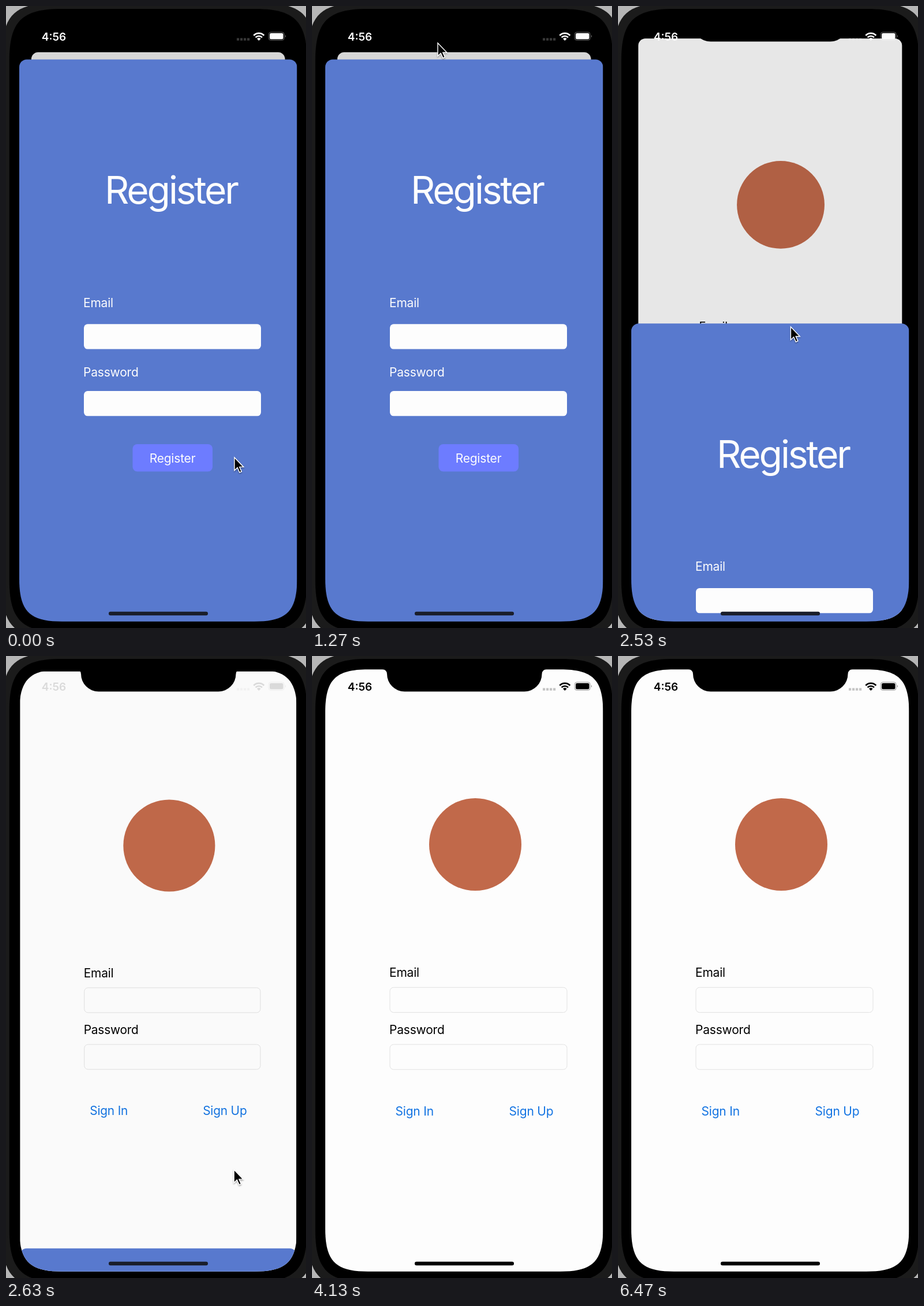
These frames come from a looping animation (520 by 1076 pixels, 6510 ms). An HTML page:

```html
<!DOCTYPE html>
<html lang="en">
<head>
<meta charset="utf-8">
<title>Register</title>
<style>
  html, body { margin: 0; width: 100%; height: 100%; overflow: hidden; background: #b6b6b6; }
  svg { display: block; width: 100vw; height: 100vh; }
  text { font: 400 21px Inter, "Liberation Sans", sans-serif; font-optical-sizing: none; letter-spacing: -0.2px; }
  .title { font-size: 66px; letter-spacing: -3.2px; }
  .clock { font-size: 19px; font-weight: 600; letter-spacing: 0; }
  .mid { text-anchor: middle; }
</style>
</head>
<body>
<svg viewBox="0 0 520 1076" xmlns="http://www.w3.org/2000/svg">
  <defs>
    <clipPath id="screen"><path id="glass"/></clipPath>
    <rect id="field" x="135" width="307" height="43.3" rx="6.5"/>
    <rect id="card" x="23" y="23" width="481.5" height="1060" rx="13"/>
    <filter id="shadow" x="-50%" y="-50%" width="200%" height="200%">
      <feDropShadow dx="0" dy="1.5" stdDeviation="1.3" flood-color="#000" flood-opacity=".4"/>
    </filter>
  </defs>

  <rect width="520" height="1076" fill="#b6b6b6"/>
  <path id="rim" fill="#1b1b1b"/>
  <path id="bezel" fill="#000"/>

  <g clip-path="url(#screen)">
    <g id="page">
      <use href="#card" fill="#fdfdfd"/>
      <circle cx="283" cy="326" r="80" fill="#c1694a"/>
      <text x="134" y="555">Email</text>
      <text x="134" y="653.5">Password</text>
      <g fill="#fdfdfd" stroke="#e1e1e1">
        <use href="#field" y="573.3"/>
        <use href="#field" y="672"/>
      </g>
      <g class="mid" fill="#1273e2">
        <text x="177.7" y="795">Sign In</text>
        <text x="380" y="795">Sign Up</text>
      </g>
      <use id="dim" href="#card"/>
    </g>
  </g>

  <path d="M122 22V23A8 8 0 0 1 130 31A30.500 30.500 0 0 0 160.500 61.500H368A30.500 30.500 0 0 0 398.500 31A8 8 0 0 1 406.500 23V22Z"/>

  <g id="status" fill="currentColor">
    <text class="clock mid" x="83" y="59.500">4:56</text>
    <path d="M400 57.600H422.200" stroke="currentColor" stroke-width="4.200" stroke-dasharray="4.200 1.800" opacity=".22"/>
    <g fill="none" stroke="currentColor" stroke-width="2.700">
      <path d="M429.300 51A12.500 12.500 0 0 1 447.300 51"/>
      <path d="M432.600 54.400A8 8 0 0 1 444 54.400"/>
    </g>
    <path d="M438.300 60L434.900 56.500A5 5 0 0 1 441.700 56.500Z"/>
    <rect x="455.200" y="45.300" width="27" height="14" rx="4" fill="none" stroke="currentColor" stroke-opacity=".4"/>
    <rect x="457" y="47" width="23.500" height="10.600" rx="2.500"/>
    <path d="M484 50Q486 52.300 484 54.600Z" opacity=".5"/>
  </g>

  <g clip-path="url(#screen)">
    <g id="sheet" fill="#fdfdfd">
      <use href="#card" y="69.500" fill="#5879ce"/>
      <text class="title mid" x="286" y="342">Register</text>
      <text x="134" y="520.500">Email</text>
      <text x="134" y="641">Password</text>
      <use href="#field" y="550.300"/>
      <use href="#field" y="666"/>
      <rect x="219.500" y="758" width="138.500" height="47.300" rx="8" fill="#6d7cff"/>
      <text class="mid" x="288.500" y="790">Register</text>
    </g>
  </g>

  <rect id="home" x="178" y="1047.800" width="172" height="6.400" rx="3.200"/>

  <path id="cursor" d="M0 0V22.500L5.200 17.600L9 26L12.400 24.500L8.800 16.500H15.800Z"
        stroke="#fff" stroke-width="1.400" filter="url(#shadow)"/>
</svg>
<script>
const LOOP = 6510, TRAVEL = 972;
const SWIPE = { start: 2490, time: 215 };
const $ = id => document.getElementById(id);
const [page, dim, status, sheet, home, cursor] =
  ['page', 'dim', 'status', 'sheet', 'home', 'cursor'].map($);

// [ms, x, y] where the pointer turns
const turns = [
  [0, 396, 782], [670, 330, 58], [980, 530, 30], [1270, 218, 64],
  [1700, 530, 25], [2470, 261, 376], [2630, 395, 888], [3100, 340, 780],
  [3950, 50, -35], [4720, 60, -35], [5530, 178, 45], [5900, 118, -35], [LOOP, 118, -35]
];

const clamp = v => Math.min(1, Math.max(0, v));
const easeOut = u => 1 - (1 - u) ** 3;

// Rounded box with continuous corners, centred in the phone
function squircle(w, h, e) {
  const l = 263.75 - w / 2, r = l + w, t = 544 - h / 2, b = t + h, c = e * 0.24;
  return `M${l} ${t + e}C${l} ${t + c} ${l + c} ${t} ${l + e} ${t}H${r - e}` +
    `C${r - c} ${t} ${r} ${t + c} ${r} ${t + e}V${b - e}` +
    `C${r} ${b - c} ${r - c} ${b} ${r - e} ${b}H${l + e}` +
    `C${l + c} ${b} ${l} ${b - c} ${l} ${b - e}Z`;
}

function slope(i, c) {
  const a = turns[Math.max(0, i - 1)], b = turns[Math.min(turns.length - 1, i + 1)];
  return (b[c] - a[c]) / (b[0] - a[0]);
}

// Hermite curve through the turns
function pointer(t, c) {
  const i = turns.findIndex(k => k[0] > t) - 1, a = turns[i], b = turns[i + 1];
  const d = b[0] - a[0], u = (t - a[0]) / d, v = 1 - u;
  return v * v * (1 + 2 * u) * a[c] + u * u * (3 - 2 * u) * b[c]
    + d * u * v * (v * slope(i, c) - u * slope(i + 1, c));
}

function draw(t) {
  const gone = easeOut(clamp((t - SWIPE.start) / SWIPE.time));
  const back = (1 - gone) ** 0.85;
  const scale = 1 - 0.087 * back, top = 23 + 57 * back;
  page.setAttribute('transform',
    `translate(${263.75 * (1 - scale)} ${top - 23 * scale}) scale(${scale})`);
  dim.setAttribute('opacity', 0.15 * back);

  sheet.setAttribute('transform', `translate(0 ${TRAVEL * gone})`);
  sheet.setAttribute('visibility', gone < 1 ? 'visible' : 'hidden');
  home.setAttribute('fill', gone < 1 ? '#1a1e2a' : '#000');

  const tone = Math.round(253 * (1 - clamp((t - 2610) / 150)));
  status.setAttribute('color', `rgb(${tone},${tone},${tone})`);
  cursor.setAttribute('transform', `translate(${pointer(t, 1)} ${pointer(t, 2)})`);
}

$('rim').setAttribute('d', squircle(541, 1098, 90));
$('bezel').setAttribute('d', squircle(516, 1078, 90));
$('glass').setAttribute('d', squircle(481.5, 1041.5, 74));

const start = performance.now();
function tick() {
  draw((performance.now() - start) % LOOP);
  requestAnimationFrame(tick);
}
tick();
</script>
</body>
</html>
```
